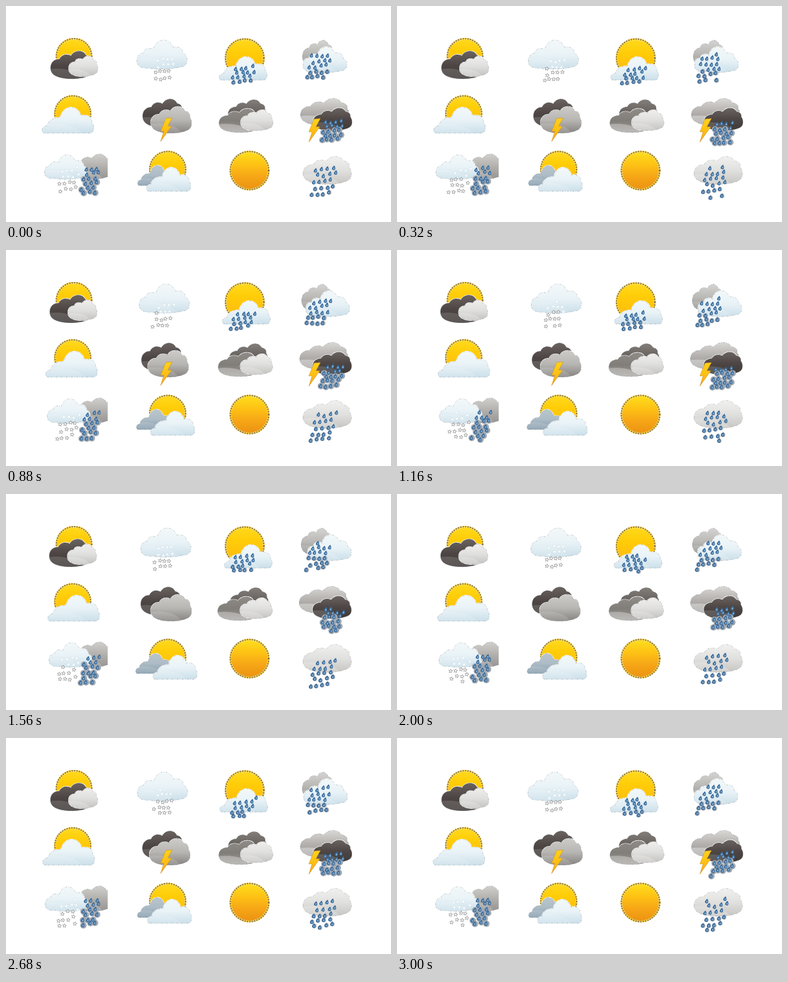
Animation, 600 px wide and 338 px high, one loop 3040 ms. Source, as an HTML page with a canvas:

```html
<!DOCTYPE html>
<html lang="en">
<head>
<meta charset="utf-8">
<title>Weather icons</title>
<style>
html, body { margin: 0; width: 100%; height: 100%; overflow: hidden; background: #fff; }
canvas { display: block; }
</style>
</head>
<body>
<canvas id="stage" width="600" height="338"></canvas>
<script>
const ctx = document.getElementById('stage').getContext('2d');
const LOOP = 3040, STEP = 40;

// Cloud outlines in a unit square
const flat = new Path2D('M.06 1C-.02 1-.03 .76 .1 .71C.12 .5 .24 .38 .35 .41C.42-.11 .68-.1 .75 .33C.9 .28 .97 .42 .96 .58C1.02 .7 1.01 1 .92 1Z');
const bowl = new Path2D('M0 .74C0 .55 .05 .45 .13 .45C.15 .27 .25 .25 .33 .32C.38-.08 .64-.12 .72 .24C.85 .2 .92 .3 .92 .46C1.04 .52 1.02 .86 .93 .91C.7 1.02 .38 1.03 .24 .97C.06 1 0 .86 0 .74Z');
const fat = new Path2D('M0 .62C-.01 .42 .08 .28 .21 .28C.26 .1 .4 .08 .48 .16C.57-.07 .78-.06 .84 .15C.94 .17 .97 .28 .96 .38C1.03 .55 1.02 .8 .92 .87C.72 1.04 .32 1.03 .16 .92C.05 .86 0 .74 0 .62Z');

const white = ['#f3f8f9', '#e9f3f7', '#cbdfe9'];
const pale = ['#efeeec', '#dfdfdd', '#c3c2bf'];
const silver = ['#cdcbc8', '#b8b6b3', '#85827f'];
const dark = ['#69625f', '#4d4644', '#3f3a38'];
const slate = ['#bac6cc', '#adbcc6', '#839bab'];
const warm = ['#ffd91c', '#ffcd08', '#ffc20c', '#fdb813'];
const hot = ['#ffdd1c', '#fdc214', '#f6a616', '#ec9312'];

function ramp(y, h, colors) {
  const g = ctx.createLinearGradient(0, y, 0, y + h);
  colors.forEach((c, i) => g.addColorStop(i / (colors.length - 1), c));
  return g;
}

function cloud(shape, x, y, w, h, colors, gloss = .14) {
  const path = new Path2D();
  path.addPath(shape, new DOMMatrix([w, 0, 0, h, x, y]));
  ctx.lineWidth = 1.6;
  ctx.strokeStyle = '#fff';
  ctx.stroke(path);
  ctx.fillStyle = ramp(y, h, colors);
  ctx.fill(path);
  ctx.save();
  ctx.clip(path);
  ctx.fillStyle = `rgba(255,255,255,${gloss})`;
  ctx.beginPath();
  ctx.ellipse(x + w * .15, y + h * 1.05, w * .6, h * .42, 0, 0, 7);
  ctx.fill();
  ctx.restore();
  ctx.lineWidth = .6;
  ctx.strokeStyle = 'rgba(105,115,120,.6)';
  ctx.setLineDash([3, 2, 1, 2]);
  ctx.stroke(path);
  ctx.setLineDash([]);
}

function sun(x, y, r, colors = warm) {
  ctx.beginPath();
  ctx.arc(x, y, r, 0, 7);
  ctx.fillStyle = ramp(y - r, 2 * r, colors);
  ctx.fill();
  ctx.beginPath();
  ctx.arc(x, y, r + 1.4, 0, 2 * Math.PI);
  ctx.strokeStyle = '#f3c838';
  ctx.lineWidth = 2.4;
  ctx.stroke();
  ctx.strokeStyle = '#766a48';
  ctx.setLineDash([1.4, 2.4]);
  ctx.stroke();
  ctx.setLineDash([]);
}

function teardrop(x, y, s) {
  ctx.beginPath();
  ctx.moveTo(x + 1.3 * s, y - 4 * s);
  ctx.bezierCurveTo(x + 4.2 * s, y + 1.5 * s, x + 1.8 * s, y + 3.2 * s, x, y + 2.9 * s);
  ctx.bezierCurveTo(x - 3.6 * s, y + 2.2 * s, x - 2.8 * s, y - .8 * s, x + 1.3 * s, y - 4 * s);
  ctx.fill();
}

function drop(x, y) {
  ctx.fillStyle = '#37689a';
  teardrop(x, y, 1.05);
  ctx.fillStyle = '#84b0d2';
  teardrop(x + .4, y + .3, .5);
}

function flake(x, y, below) {
  ctx.beginPath();
  for (let i = 0; i < 10; i++) {
    const a = i * Math.PI / 5 - 1.4, r = i % 2 ? 1.4 : 3.1;
    ctx.lineTo(x + r * Math.cos(a), y + r * Math.sin(a));
  }
  ctx.closePath();
  ctx.fillStyle = '#fff';
  ctx.fill();
  ctx.strokeStyle = below ? '#909090' : 'rgba(215,228,235,.8)';
  ctx.lineWidth = .8;
  ctx.stroke();
}

const noise = n => { const v = Math.sin(n * 127.1) * 43758.5; return v - Math.floor(v); };

// Staggered rows, higher to the right, that fall, drift left and wrap around;
// a grey haze of the given radius surrounds whatever is below the cloud
function fall(draw, t, x, y, w, h, cols, rows, base, seed, haze = 0) {
  const points = [];
  for (let i = 0; i < cols * rows; i++) {
    const row = i % rows, col = Math.floor(i / rows);
    const p = ((row + noise(i + seed) * .5) / rows + t * 3 / LOOP) % 1;
    const across = (col + .5 + (row % 2) * .5 + (noise(i + seed + 50) - .5) * .3) / (cols + .5);
    points.push([x + across * w + 4 - 9 * p, y + p * h + 4 * (.5 - across)]);
  }
  ctx.fillStyle = '#a0a8b1';
  if (haze) for (const [px, py] of points) {
    if (py <= base) continue;
    ctx.beginPath();
    ctx.arc(px + 1, py, haze, 0, 7);
    ctx.fill();
  }
  for (const [px, py] of points) draw(px, py, py > base);
}

function bolt(x, y) {
  const pts = [10, 0, 20, -1, 13, 12, 19, 12, 2, 36, 7, 20, 2, 20];
  ctx.beginPath();
  for (let i = 0; i < pts.length; i += 2) ctx.lineTo(x + pts[i], y + pts[i + 1]);
  ctx.closePath();
  ctx.fillStyle = ramp(y, 36, ['#ffd21a', '#fdbf12', '#f4a51a']);
  ctx.fill();
  ctx.strokeStyle = '#c98f2a';
  ctx.lineWidth = .6;
  ctx.stroke();
}

function draw(t) {
  const sway = n => (1 - Math.cos(2 * Math.PI * n * t / LOOP)) / 2;
  const s = sway(1), quick = sway(2);
  const flash = t < 1360 || t > 2660;
  ctx.fillStyle = '#fff';
  ctx.fillRect(0, 0, 600, 338);

  // Top row
  sun(106, 78.5, 26);
  cloud(fat, 69.5 - 2 * s, 71, 66, 43, dark);
  cloud(fat, 98 - 2 * s, 79, 45, 31, pale, .2);

  cloud(bowl, 204 + 6 * s, 53.5, 78, 45, white);
  fall(flake, t, 230, 80, 32, 40, 4, 4, 97, 3);

  sun(372, 81.5, 28.5);
  cloud(flat, 332 + 8 * s, 79, 75, 37, white);
  fall(drop, t, 349, 95, 40, 28, 4, 4, 113, 11, 3.4);

  cloud(fat, 462 - 2 * s, 54, 48, 42, ['#d4d3d1', '#b9b8b5', '#8f8d8a']);
  cloud(bowl, 463 + 7 * s, 64, 68, 40, white);
  fall(drop, t, 467, 76, 40, 42, 4, 5, 100, 23, 3.8);

  // Middle row
  sun(104, 168.5, 26.5);
  cloud(flat, 56 + 9 * s, 158, 81, 41, white);

  cloud(fat, 213 - 3 * s, 146, 64, 44, dark);
  cloud(fat, 226 - 5 * quick, 158, 63, 41, silver);
  if (flash) bolt(239, 176);

  cloud(fat, 346 + 3 * s, 147, 60, 38, ['#827d79', '#68635f', '#55504d']);
  cloud(fat, 332 - 2 * s, 161, 66, 37, ['#8f8b87', '#817d79', '#9d9a96'], .3);
  cloud(fat, 366 - s, 163, 50, 32, pale, .2);

  cloud(fat, 459 - 2 * s, 145, 76, 42, ['#d9d7d4', '#b3b0ad', '#96938f'], .35);
  cloud(fat, 479 - s, 160, 60, 35, dark);
  if (flash) bolt(470, 177);
  fall(drop, t, 490, 179, 37, 36, 4, 5, 192, 31, 5);

  // Bottom row
  ctx.save();
  ctx.beginPath();
  ctx.rect(50, 225, 108.5, 85);
  ctx.clip();
  cloud(fat, 104, 232, 62, 39, ['#d0cfcc', '#b2b0ad', '#969390'], .2);
  cloud(bowl, 60 + 7 * s, 233, 66, 38, white);
  fall(drop, t, 116, 253, 30, 45, 3, 6, 266, 43, 5);
  fall(flake, t, 80, 253, 36, 42, 4, 4, 269, 57);
  ctx.restore();

  sun(252, 255.5, 26.5);
  cloud(flat, 205 - 3 * s, 249, 56, 32, slate);
  cloud(flat, 219 + 10 * s, 252, 69, 38, white);

  sun(379.5, 257.5, 28.5, hot);

  cloud(fat, 463, 236, 75, 43, ['#f0f0ee', '#e0e0de', '#c6c5c2'], .2);
  fall(drop, t, 475, 253, 40, 47, 4, 5, 278, 71, 3.4);
}

const start = performance.now();
function tick() {
  const t = (performance.now() - start) % LOOP;
  draw(Math.floor(t / STEP) * STEP);
  requestAnimationFrame(tick);
}
tick();
</script>
</body>
</html>
```
